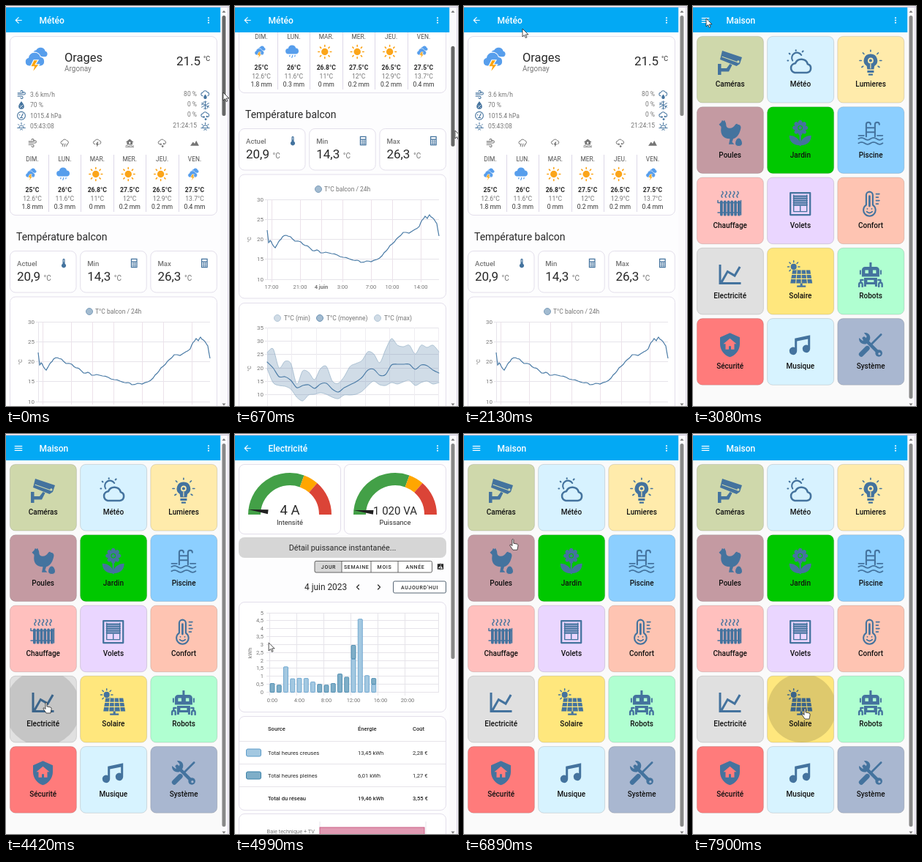
These frames come from a looping animation (305x546 px, 8 s). An HTML page:

```html
<!DOCTYPE html>
<html lang="fr">
<head>
<meta charset="utf-8">
<title>Maison</title>
<style>
html, body { margin: 0; width: 100%; height: 100%; overflow: hidden; background: #fafafa; }
svg { display: block; width: 305px; height: 546px; font-family: Roboto, "Noto Sans", sans-serif; }
</style>
</head>
<body>
<svg id="stage" viewBox="0 0 305 546" xmlns="http://www.w3.org/2000/svg"></svg>
<script>
const BLUE = '#44739e', GREY = '#757575', INK = '#282828';
const LOOP = 8000;

// ---------- drawing helpers ----------
const rect = (x, y, w, h, fill, extra = '') =>
  `<rect x="${x}" y="${y}" width="${w}" height="${h}" fill="${fill}" ${extra}/>`;
const card = (x, y, w, h) => rect(x + .5, y + .5, w - 1, h - 1, '#fff', 'rx="7.5" stroke="#e3dfeb"');
const circle = (x, y, r, fill, extra = '') => `<circle cx="${x}" cy="${y}" r="${r}" fill="${fill}" ${extra}/>`;
const line = (x1, y1, x2, y2, c = '#e6e4ea', w = 1) =>
  `<path d="M${x1} ${y1}L${x2} ${y2}" stroke="${c}" stroke-width="${w}"/>`;
const crisp = v => Math.floor(v) + .5;
const text = (s, x, y, size, fill = INK, anchor = 'start', weight = 400, extra = '') =>
  `<text x="${x}" y="${y}" font-size="${size}" fill="${fill}" text-anchor="${anchor}" font-weight="${weight}" ${extra}>${s}</text>`;
const sideText = (s, x, y) => text(s, 0, 0, 7.5, GREY, 'middle', 400, `transform="translate(${x} ${y}) rotate(-90)"`);
const fillPath = (d, c = 'currentColor', extra = '') => `<path d="${d}" fill="${c}" fill-rule="evenodd" ${extra}/>`;
const strokePath = (d, w = 2, c = 'currentColor') =>
  `<path d="${d}" fill="none" stroke="${c}" stroke-width="${w}" stroke-linecap="round" stroke-linejoin="round"/>`;
const range = n => [...Array(n).keys()];

function smooth(pts) {
  let d = `M${pts[0]}`;
  for (let i = 0; i < pts.length - 1; i++) {
    const a = pts[i - 1] || pts[i], b = pts[i], c = pts[i + 1], e = pts[i + 2] || c;
    const k = 1 / 7;
    d += `C${b[0] + (c[0] - a[0]) * k} ${b[1] + (c[1] - a[1]) * k} ${c[0] - (e[0] - b[0]) * k} ${c[1] - (e[1] - b[1]) * k} ${c}`;
  }
  return d;
}

// ---------- icons on a 24 unit grid ----------
const rays = (x, y, a, b, n, w) => strokePath(range(n).map(i => {
  const c = Math.cos(i * 2 * Math.PI / n), s = Math.sin(i * 2 * Math.PI / n);
  return `M${x + a * c} ${y + a * s}L${x + b * c} ${y + b * s}`;
}).join(''), w);
const skyLine = strokePath('M6 15A4 4 0 0 1 6 7A6 6 0 0 1 17 6A4.6 4.6 0 0 1 18 15', 1.8);
const WAVES = 'M1 17q2.7-2 5.5 0t5.5 0t5.5 0t5.5 0M1 21q2.7-2 5.5 0t5.5 0t5.5 0t5.5 0';
const RIM = 'stroke="#fff" stroke-width=".8"';

const ICONS = {
  back: fillPath('M20 11v2H8l5.5 5.5-1.4 1.4L4.2 12l7.9-7.9 1.4 1.4L8 11Z'),
  menu: fillPath('M3 6h18v2H3ZM3 11h18v2H3ZM3 16h18v2H3Z'),
  dots: circle(12, 6, 2, 'currentColor') + circle(12, 12, 2, 'currentColor') + circle(12, 18, 2, 'currentColor'),
  wind: strokePath('M3 8h10a3 3 0 1 0-3-4M3 12h16a3 3 0 1 0-3-4M3 16h10a3 3 0 1 1-3 4', 2),
  drop: fillPath('M12 2C9 7 5 10 5 15a7 7 0 0 0 14 0C19 10 15 7 12 2Z') + strokePath('M9 18l6-6M9.5 13h.1M14.500 17.500h.1', 1.8, '#fff'),
  gauge: circle(12, 12, 10, 'none', 'stroke="currentColor" stroke-width="2"') + strokePath('M12 15l4-8M7 10h1M9 17h6', 2.2),
  horizon: strokePath('M2 16h20M6 16a6 6 0 0 1 12 0M12 3v4M4 7l2 2M20 7l-2 2M9 21l3-2 3 2', 1.8),
  rain: skyLine + strokePath('M8 14l-2 6M13 14l-2 7M18 15l-2 5', 2),
  shower: skyLine + fillPath('M12 11c-2 3-4 5-4 7.500a4 4 0 0 0 8 0c0-2.500-2-4.500-4-7.500Z'),
  snow: strokePath('M12 2v20M3 7l18 10M21 7L3 17M9 3l3 3 3-3M9 21l3-3 3 3M3 11l4-2V5M21 13l-4 2v4', 1.7),
  hail: skyLine + circle(8.5, 15, 2.3, 'currentColor') + circle(13, 20.5, 2.5, 'currentColor') + circle(16, 14, 2, 'currentColor'),
  storm: skyLine + fillPath('M12 9l-4 7h3v6l5-8h-3l2-5Z'),
  flood: fillPath('M12 2L2 10h3v6h14v-6h3ZM10 9h4v5h-4Z') + strokePath('M2 19q2.5-2 5 0t5 0t5 0t5 0M2 22h20', 1.6),
  hills: fillPath('M1 19L8 9l4 5 4-8 7 13Z'),
  thermo: fillPath('M9.500 13V4.500a2.500 2.500 0 0 1 5 0V13a5 5 0 1 1-5 0Z') + strokePath('M12 5v4', 1.2, '#fff'),
  calc: fillPath('M5 2h14v20H5ZM7 4v4h10V4ZM7 10v3h2.500v-3ZM11 10v3h2.500v-3ZM15 10v3h2v-3ZM7 14v3h2.500v-3ZM11 14v3h2.500v-3ZM15 14v3h2v-3ZM7 18v2h2.500v-2ZM11 18v2h2.500v-2ZM15 18v2h2v-2Z'),
  sun: circle(12, 12, 5.8, 'currentColor') + rays(12, 12, 9, 11, 8, 2),
  cloudBolt: fillPath('M12.500 9.500a3 3 0 0 1-.3-6a4.500 4.500 0 0 1 8.300 1a2.600 2.600 0 0 1 0 5Z', '#579eec') +
    fillPath('M5.500 18a4 4 0 0 1-.5-7.800a5.800 5.800 0 0 1 11.200-.8a4.400 4.400 0 0 1 .3 8.600Z', '#579eec', RIM) +
    fillPath('M10 12.500L7 18.500h3.300L8.500 24.500l6.500-8h-3.500l2.500-4Z', '#fda50f', RIM),
  cloudRain: fillPath('M5.500 15.500a4.500 4.500 0 0 1-.3-9a6.500 6.500 0 0 1 12.600-.5a4.800 4.800 0 0 1 .7 9.500Z', '#579eec') +
    strokePath('M8 18l-.5 1.500M12.500 18l-1.200 3.500M16.500 18l-.5 1.500', 1.5, '#579eec'),
  compare: fillPath('M3 4h8V2h2v20h-2v-2H3ZM5 17h6v-7Z') + fillPath('M14 4h7v16h-7v-2h5l-5-8Z'),

  camera: fillPath('M5 1L23 7L21 13L18 15L3 9Z') + strokePath('M5 6.5l14 5', .8, '#cfd8ab') + circle(19.6, 11, 1.1, '#cfd8ab') +
    fillPath('M1 13h3v10H1ZM4 17h5l3-4 2 1-3 6H4Z'),
  weather: strokePath('M5 10a4.5 4.5 0 0 1 8-5M8 1V.5M2.5 4L2 3.5M1 10H.5M14 2l.6-.6', 1.4) +
    strokePath('M7 21h11a4 4 0 0 0 .8-7.8A6 6 0 0 0 7.5 12.5A4.3 4.3 0 0 0 7 21Z', 1.7),
  bulb: fillPath('M12 4a6 6 0 0 1 3.5 11L15 18H9l-.5-3A6 6 0 0 1 12 4Z') + circle(12, 10, 2, 'none', 'stroke="#ffebab" stroke-width="1.2"') +
    strokePath('M12 13v4', .8, '#ffebab') + fillPath('M9 19h6v2H9ZM10 22h4v1.5h-4Z') +
    strokePath('M12 .5v1.2M5 3l1 1M19 3l-1 1M2 10h1.6M20.4 10H22M4 16l1.2-.8M20 16l-1.2-.8', 1.1),
  hen: fillPath('M2 4l2-2 1-2 1 1 1-1 1 2c1 2 0 4 2 5 3 1 5 0 7-3 1-1 2-1 2 0 2 0 3 1 3 3-1 5-3 9-7 10l-1 3 2 2h-5l1-5c-6 0-9-4-8-10L4 6Z') +
    fillPath('M20 16c2 0 3.4 3 3.4 5a3.4 2.9 0 0 1-6.8 0c0-2 1.4-5 3.4-5Z', 'currentColor', 'stroke="#c49aa2" stroke-width=".8"'),
  flower: range(8).map(i => `<ellipse cx="12" cy="3" rx="2" ry="3" fill="currentColor" transform="rotate(${i * 45} 12 7)"/>`).join('') +
    circle(12, 7, 2.2, '#00c800') + circle(12, 7, 1.5, 'currentColor') + strokePath('M12 13v10', 1.5) +
    fillPath('M12 23C4 23 2 18 2 14c5 0 10 3 10 9ZM12 23c8 0 10-5 10-9-5 0-10 3-10 9Z'),
  pool: strokePath('M8 15V4a2 2 0 0 1 4 0M16 15V4a2 2 0 0 1 4 0M8 7h8M8 11h8', 1.4) + strokePath(WAVES, 1.2) + strokePath('M1 14h5M18 14h5', 1.1),
  radiator: range(6).map(i => rect(3 + i * 3.2, 9, 2.5, 14, 'currentColor', 'rx="1"')).join('') +
    strokePath('M1 11h21M1 20h21M1 11v-2M22 9v13', 1) +
    strokePath(range(5).map(i => `M${5 + i * 3.5} 6q-1.5-1.3 0-2.6t0-2.6`).join(''), 1),
  shutter: strokePath('M3 2h18v20H3Z', 1.5) + strokePath('M6 5h12M6 7h12M6 9h12M6 11h12M6 13h12', 1.4) + strokePath('M6 4v15h12V4M12 14v5', .9),
  comfort: strokePath('M8 13V4a3 3 0 0 1 6 0v9a5.5 5.5 0 1 1-6 0Z', 1.4) + strokePath('M11 5v9', 1.8) +
    strokePath('M8.5 19q2.5 2.5 5 0M9 16.5h.1M13 16.5h.1', 1.2) + strokePath('M17 3h3M17 6h2M17 9h3M17 12h2', 1.1),
  chart: fillPath('M16 11.8l4.2-7.3 1.8 1-5.3 9-6.5-3.7L5.5 19H22v2H2V3h2v14.5L9.5 8Z'),
  solar: circle(6, 5, 2.7, 'currentColor') + rays(6, 5, 4.1, 5.5, 8, 1) + fillPath('M5 8h16l2 12H3Z') +
    strokePath('M4.5 12h18M4 16h19M9 8l-1 12M13 8v12M17 8l1.5 12', .7, '#ffe77d') + fillPath('M12 20h2v2h3v1.5H9V22h3Z'),
  robot: fillPath('M11 1h2v4h4a3 3 0 0 1 3 3v6H4V8a3 3 0 0 1 3-3h4ZM7 8v3h3V8ZM14 8v3h3V8ZM2 8h1.3v4H2ZM20.7 8H22v4h-1.3Z') +
    fillPath('M6 15h12v8h-2v-2H8v2H6ZM9 17v2h6v-2Z') + strokePath('M5 17H3v2M19 17h2v2M1.5 23v-2a1.5 1.5 0 0 1 3 0v2M19.5 23v-2a1.5 1.5 0 0 1 3 0v2', 1.6),
  shield: fillPath('M11 13h2v3h3v-5h2l-6-5-6 5h2v5h3ZM12 1l9 4v6c0 5.5-3.8 10.7-9 12-5.2-1.3-9-6.5-9-12V5Z'),
  music: fillPath('M21 3v12.5a3.5 3.5 0 1 1-2-3.2V6.5L9 8.6v8.9a3.5 3.5 0 1 1-2-3.2V6Z'),
  tools: strokePath('M6 6l13 13', 3) + strokePath('M21.500 2.500l-9 9', 1.8) + strokePath('M9 15l-5.500 5.500', 4.4) +
    fillPath('M1.500 5.500l3 2.500 3-1 1-3-2.500-3c4-1 7 3 5 7l-3 3c-4 1-7-2-6.500-5.500Z') + circle(19.500, 19.500, 3.2, 'currentColor') +
    circle(20, 20, 1.1, '#a9b7d0')
};
const icon = (name, x, y, size, color = BLUE) =>
  `<g transform="translate(${x - size / 2} ${y - size / 2}) scale(${size / 24})" color="${color}">${ICONS[name]}</g>`;

// ---------- weather page ----------
function balconyChart() {
  const top = 431, step = 27.3;
  let out = card(5, 396.5, 284, 170) + circle(114, 417, 4.5, '#a2bbd0', 'stroke="#7f9fbc"') +
    text('T°C balcon / 24h', 122, 420, 8.5, GREY);
  range(5).forEach(i => {
    const y = crisp(top + i * step);
    out += line(41, y, 279, y) + text(30 - i * 5, 39, y + 2.5, 8, GREY, 'end');
  });
  const ticks = { '17:00': 50, '21:00': 89, '4 juin': 118, '3:00': 147, '7:00': 186, '10:00': 215, '14:00': 254 };
  for (const [label, x] of Object.entries(ticks))
    out += line(x + .5, top, x + .5, 544, '#ece2ea') + text(label, x, 553, 7.6, GREY, 'middle', label === '4 juin' ? 700 : 400);
  out += line(44.5, top, 44.5, 540) + sideText('°C', 22, 486);
  const pts = '44,473 46,490 48,487 51,492 55,497 58,492 61,487 65,482 70,480 76,482 82,488 90,489 96,494 100,495 106,501 112,500 117,504 124,503 132,505 140,507 148,510 156,512 162,514 167,514 172,517 180,515 186,516 194,513 201,508 207,501 212,494 218,489 223,483 230,476 238,477 246,472 252,468 256,459 260,454 263,457 266,452 270,456 274,461 276,464 279,481';
  const coarse = pts.split(' ').map(p => p.split(',').map(Number));
  const fine = coarse.flatMap((p, i) => {
    const q = coarse[i + 1];
    return q ? [p, [(p[0] + q[0]) / 2, (p[1] + q[1]) / 2 + Math.sin(i * 2.4) * .8]] : [p];
  });
  return out + `<path d="M${fine.join('L')}" fill="none" stroke="#4a7ba6" stroke-width="1.2"/>`;
}

function rangeChart() {
  const curve = s => s.split(' ').map((y, i) => [44 + i * 8.1, +y]);
  const high = curve('640 635 661 652 655 683 665 667 677 662 659 679 682 673 659 655 651 639 642 654 636 621 630 632 630 642 630 633 630 639');
  const mean = curve('653 661 673 673 678 688 685 684 689 683 682 690 694 688 684 680 674 664 663 671 670 657 656 656 656 663 657 658 664 668');
  const low = curve('662 681 685 686 690 701 706 698 697 695 697 701 703 698 698 697 693 685 679 684 685 681 683 680 678 685 681 679 683 681');
  let out = card(5, 572, 284, 180);
  [[58, 'min'], [116, 'moyenne'], [195, 'max']].forEach(([x, name], i) => {
    out += circle(x, 593, 4.5, i === 1 ? '#a2bbd0' : '#d0dce6', `stroke="${i === 1 ? '#6d93b5' : '#b4c7d8'}"`) +
      text(`T°C (${name})`, x + 9, 596, 8.5, GREY);
  });
  range(7).forEach(i => {
    const y = crisp(606.5 + i * 18.2);
    out += line(41, y, 279, y) + text(35 - i * 5, 39, y + 2.5, 8, GREY, 'end');
  });
  range(8).forEach(i => out += line(crisp(44 + i * 33.5), 606, crisp(44 + i * 33.5), 720, '#efedf2'));
  out += sideText('°C', 22, 662);
  return out + `<path d="${smooth(high)}L${smooth([...low].reverse()).slice(1)}Z" fill="${BLUE}" fill-opacity=".25"/>` +
    strokePath(smooth(high), .8, '#9db6cb') + strokePath(smooth(low), .8, '#9db6cb') + strokePath(smooth(mean), 1.1, '#4a7ba6');
}

function weatherPage() {
  let out = card(5, 41, 284, 245) + icon('cloudBolt', 41, 73, 36) +
    text('Orages', 80, 76.3, 16.5) + text('Argonay', 80, 89, 10, GREY) +
    text('21.5', 233, 81, 17) + text('°C', 270, 74.5, 9);
  const left = [['wind', '3.6 km/h'], ['drop', '70 %'], ['gauge', '1015.4 hPa'], ['horizon', '05:43:08']];
  const right = [['shower', '80 %'], ['snow', '0 %'], ['hail', '0 %'], ['horizon', '21:24:15']];
  range(4).forEach(i => {
    const y = 121 + i * 14.4;
    out += icon(left[i][0], 21, y, 13) + text(left[i][1], 33, y + 3, 8.5, GREY) +
      icon(right[i][0], 272.5, y, 13.5) + text(right[i][1], 261, y + 1.6, 8.5, GREY, 'end');
  });
  const days = [
    ['DIM.', 'wind', 'cloudBolt', 25, 12.6, 1.8], ['LUN.', 'rain', 'cloudRain', 26, 11.6, .3],
    ['MAR.', 'storm', 'sun', 26.8, 11, 0], ['MER.', 'flood', 'sun', 27.5, 12, .2],
    ['JEU.', 'hail', 'sun', 26.5, 12.9, .2], ['VEN.', 'hills', 'cloudBolt', 27.5, 13.7, .4]
  ];
  const skySize = { sun: 19.5, cloudBolt: 17.5, cloudRain: 20 };
  days.forEach(([day, small, sky, max, min, mm], i) => {
    const x = 36 + i * 44.4;
    out += icon(small, x, 187, 13, GREY) + text(day, x, 211.5, 8.4, '#505050', 'middle') +
      icon(sky, x - 2, 229.5, skySize[sky], '#fba51a') +
      text(max + '°C', x, 253.5, 8.6, INK, 'middle', 700) + text(min + '°C', x, 265.5, 8.6, GREY, 'middle') +
      text(mm + ' mm', x, 277.3, 8.6, '#333', 'middle');
    if (i) out += line(crisp(x - 22), 203, crisp(x - 22), 281, '#ddd8e8');
  });
  out += text('Température balcon', 14, 319.8, 14);
  [['Actuel', '20,9', 'thermo'], ['Min', '14,3', 'calc'], ['Max', '26,3', 'calc']].forEach(([label, value, sign], i) => {
    const x = 5 + i * 96.2;
    out += card(x, 334, 91.5, 57.5) + text(label, x + 10, 354.5, 9.6, GREY, 'start', 500) + icon(sign, x + 74, 351, 15) +
      text(value, x + 10, 375, 17) + text('°C', x + 46.5, 375, 10, GREY);
  });
  return out + balconyChart() + rangeChart();
}

// ---------- home page ----------
const TILES = [
  ['Caméras', 'camera', '#cfd8ab'], ['Météo', 'weather', '#d7f2ff'], ['Lumieres', 'bulb', '#ffebab'],
  ['Poules', 'hen', '#c49aa2'], ['Jardin', 'flower', '#00c800'], ['Piscine', 'pool', '#8ccfff'],
  ['Chauffage', 'radiator', '#ffc0be'], ['Volets', 'shutter', '#ead6ff'], ['Confort', 'comfort', '#fec4b2'],
  ['Electricité', 'chart', '#e0e0e0'], ['Solaire', 'solar', '#ffe77d'], ['Robots', 'robot', '#b0ffd1'],
  ['Sécurité', 'shield', '#ff7b7b'], ['Musique', 'music', '#d7f3ff'], ['Système', 'tools', '#a9b7d0']
];
const tileX = i => 5 + (i % 3) * 96.2;
const tileY = i => 41 + Math.floor(i / 3) * 96.3;
const tileBox = (i, fill, extra) => rect(tileX(i) + .4, tileY(i) + .4, 91, 90.7, fill, `rx="7.5" ${extra}`);

function homePage() {
  return TILES.map(([label, sign, color], i) =>
    tileBox(i, color, 'stroke="#000" stroke-opacity=".16" stroke-width=".8"') +
    icon(sign, tileX(i) + 45.5, tileY(i) + 36.5, 36) +
    text(label, tileX(i) + 45.7, tileY(i) + 69.2, 10, '#111', 'middle', 500)).join('');
}

// ---------- electricity page ----------
function gauge(cx, value, label, size, turn) {
  const cy = 110, R = 48.5;
  const at = deg => `${cx + R * Math.cos(deg * Math.PI / 180)} ${cy - R * Math.sin(deg * Math.PI / 180)}`;
  const arc = (a, b, c) => `<path d="M${at(a)}A${R} ${R} 0 0 1 ${at(b)}" fill="none" stroke="${c}" stroke-width="17"/>`;
  return card(cx - 70, 41, 140, 96) + arc(180, 70, '#43a047') + arc(70, 49, '#ffa600') + arc(49, 0, '#db4437') +
    `<path d="M-30 -3L-57 0L-30 3Z" fill="#212121" transform="translate(${cx} ${cy}) rotate(${turn})"/>` +
    text(value, cx, 109.5, size, INK, 'middle') + text(label, cx, 124, 9.3, INK, 'middle');
}

function energyChart() {
  const base = 352.5, unit = 21.7;
  let out = card(5, 229, 284, 151);
  range(11).forEach(i => {
    const y = crisp(base - i * unit / 2);
    out += line(43, y, 278, y) + text(String(i / 2).replace('.', ','), 39, y + 2.6, 7.5, GREY, 'end');
  });
  range(6).forEach(i => {
    const x = 47.5 + i * 37;
    out += line(x, 244, x, 357) + text(i * 4 + ':00', x + 3.5, 366, 7.5, GREY, 'middle');
  });
  out += line(278.5, 244, 278.5, 353) + sideText('kWh', 23, 299);
  const low = [0, 0, 1.6, .85, .88, .87, .65, 0, 0, 0, 0, 0, 2.1, 4.6, 1.05, .5];
  const full = [.55, .45, 0, 0, 0, 0, 0, .5, .45, .55, 1.15, .95, .85, 0, 0, .37];
  const bar = (i, from, h, fill, edge) => h ?
    rect(48 + i * 9.25, base - (from + h) * unit, 6, h * unit, fill, `rx="1" stroke="${edge}" stroke-width=".8"`) : '';
  low.forEach((v, i) => out += bar(i, 0, v, '#a3c8e1', '#5c9cc9') + bar(i, v, full[i], '#7faec8', '#3b82a9'));
  return out;
}

function powerPage() {
  const mid = (s, x, y) => text(s, x, y, 7, INK, 'middle', 500, 'letter-spacing=".65"');
  let out = gauge(75, '4 A', 'Intensité', 18.5, 7) + gauge(219, '1 020 VA', 'Puissance', 15, 6) +
    rect(5, 141, 284, 28, '#d6d6d6', 'rx="8"') + text('Détail puissance instantanée...', 147, 158.7, 10.8, INK, 'middle') +
    rect(109, 173.5, 160.5, 15.5, '#fff', 'rx="2"') + rect(109, 173.5, 37, 15.5, '#d8d8d8') +
    rect(109, 173.5, 160.5, 15.5, 'none', 'rx="2" stroke="#555" stroke-width=".9"');
  [146, 186, 223].forEach(x => out += line(x, 173.5, x, 189, '#555', .9));
  out += mid('JOUR', 128, 183.8) + mid('SEMAINE', 166.2, 183.8) + mid('MOIS', 204.5, 183.8) + mid('ANNÉE', 246.5, 183.8) +
    icon('compare', 281, 181, 11, INK) + text('4 juin 2023', 95, 213, 11.9) +
    strokePath('M169.5 206l-3 3 3 3M195.5 206l3 3-3 3', 1.2, INK) +
    rect(216.5, 201, 72, 16, '#fff', 'rx="2" stroke="#456" stroke-width=".9"') + mid("AUJOURD'HUI", 252.5, 211.6) +
    energyChart() + card(5, 385, 284, 129);
  const rows = [['Source', 'Énergie', 'Coût', 405], ['Total heures creuses', '13,45 kWh', '2,28 €', 437.5],
    ['Total heures pleines', '6,01 kWh', '1,27 €', 468.5], ['Total du réseau', '19,46 kWh', '3,55 €', 500]];
  rows.forEach(([name, kwh, cost, y], i) => {
    const cell = (s, x) => text(s, x, y, 7.6, INK, 'start', i % 3 ? 400 : 500);
    out += cell(name, 45) + cell(kwh, 168) + cell(cost, 243);
    if (i) out += line(6, crisp(y - 18.5), 288, crisp(y - 18.5));
  });
  out += rect(15.5, 430, 20, 10, '#a3c8e1', 'rx="2" stroke="#5c9cc9"') + rect(15.5, 461, 20, 10, '#7faec8', 'rx="2" stroke="#3b82a9"');
  out += card(5, 518, 284, 60) + line(116, 529, 116, 546) + line(261, 529, 261, 546) +
    text('Baie technique + TV', 109, 545, 7.4, GREY, 'end') + rect(116, 537, 143, 14, '#e09ab2', 'stroke="#c8547e" stroke-width=".9"');
  return out;
}

// ---------- stage ----------
const header = (title, sign) => rect(0, 2, 293.5, 34, '#03a9f4') + icon(sign, 17, 19.5, 14, '#fff') +
  text(title, 45.5, 23.7, 12, '#fff', 'start', 500) + icon('dots', 277, 19.5, 13, '#fff');
const paper = rect(0, 0, 305, 546, '#fdfdfe');

const stage = document.getElementById('stage');
stage.innerHTML = `<defs><clipPath id="clip10">${tileBox(10, '#000', '')}</clipPath><clipPath id="clip9">${tileBox(9, '#000', '')}</clipPath></defs>` +
  rect(0, 0, 305, 546, '#fafafa') +
  `<g id="weather">${paper}<g id="scroller">${weatherPage()}</g>${header('Météo', 'back')}</g>` +
  `<g id="home">${homePage()}${header('Maison', 'menu')}</g>` +
  `<g id="power">${paper}${powerPage()}${header('Electricité', 'back')}</g>` +
  `<g id="ripple9" clip-path="url(#clip9)">${circle(50, 374, 52, '#000', 'opacity=".12"')}</g>` +
  `<g id="ripple10" clip-path="url(#clip10)">${circle(149, 374, 47, '#000', 'opacity=".13"')}</g>` +
  circle(17, 19.5, 14.5, '#fff', 'id="press" opacity=".16"') +
  rect(0, 0, 305, 1, '#f6f3fa') + rect(0, 1, 305, 1, '#c9c3d4') + rect(293.5, 2, 11.5, 544, '#fbfafc') +
  line(303.5, 0, 303.5, 546, '#ddd6e8') +
  fillPath('M295.5 9h5l-2.5-3Z', '#777') + fillPath('M295.5 542.5h5l-2.5 3Z', '#777') +
  rect(295.5, 13, 5, 137, '#888', 'id="thumb" rx="2.5"') +
  `<g id="arrow">${fillPath('M0 0V11L2.6 8.6L4.3 12.5L6 11.7L4.3 8H8Z', '#fff', 'stroke="#222" stroke-width=".8"')}</g>` +
  `<g id="hand">${fillPath('M0 0Q1.5-1.5 2 0V5L7 6Q8.5 6.5 8 9L7 14H1L-3 8Q-3 6-1.5 7L0 8.5Z', '#fff', 'stroke="#222" stroke-width=".8"')}</g>`;
const el = id => document.getElementById(id);
const show = (id, on) => el(id).setAttribute('display', on ? 'inline' : 'none');

// ---------- motion ----------
// The screen refreshes in bursts: start, end, number of steps.
const BURSTS = [[120, 940, 7], [1190, 2130, 8], [2270, 3200, 8], [3370, 4300, 8], [4420, 4570, 2],
  [4870, 5790, 8], [5940, 6080, 2], [6370, 6490, 2], [6770, 7610, 8], [7900, 7900, 1]];
const REFRESH = [0, ...BURSTS.flatMap(([a, b, n]) => range(n).map(i => n > 1 ? a + (b - a) * i / (n - 1) : a))];
const snap = t => REFRESH.filter(r => r <= t + .01).pop();

const SCROLL = [[0, 0], [120, 8], [393, 92], [530, 137], [667, 167], [940, 178], [1190, 172], [1324, 151],
  [1459, 105], [1593, 52], [1727, 10], [1861, 0]];
const CURSOR = [[0, 297, 118], [120, 298, 130], [667, 301, 170], [940, 301, 173], [1190, 303, 166], [1324, 304, 153],
  [1727, 301, 128], [1861, 230, 90], [2130, 80, 31], [2270, 60, 27], [2669, 18, 17], [3200, 18, 17], [4300, 54, 367],
  [4570, 54, 367], [5790, 22, 33], [6080, 18, 16], [6490, 18, 16], [7610, 152, 375]];

function track(keys, t) {
  const i = keys.findIndex(k => k[0] > t);
  if (i < 0) return keys[keys.length - 1].slice(1);
  const a = keys[i - 1], b = keys[i], u = (t - a[0]) / (b[0] - a[0]);
  return a.slice(1).map((v, j) => v + (b[j + 1] - v) * u);
}

function render(time) {
  const t = snap(time);
  const page = t < 3060 ? 'weather' : t < 4560 || t >= 6480 ? 'home' : 'power';
  ['weather', 'home', 'power'].forEach(id => show(id, id === page));

  const scroll = Math.round(track(SCROLL, t)[0]);
  el('scroller').setAttribute('transform', `translate(0 ${-scroll})`);
  const thumb = el('thumb');
  thumb.setAttribute('y', 13 + (page === 'weather' ? scroll * .25 : 0));
  thumb.setAttribute('height', { weather: 137, home: 523, power: 294 }[page]);
  thumb.setAttribute('fill', t < 1800 ? '#666' : '#888');

  show('ripple9', t >= 4420 && t < 4560);
  show('ripple10', t >= 7900);
  show('press', (t >= 2660 && t < 3060) || (t >= 5940 && t < 6480));

  const [x, y] = track(CURSOR, t);
  const hand = page === 'home' && y > 41;
  show('hand', hand);
  show('arrow', !hand);
  el(hand ? 'hand' : 'arrow').setAttribute('transform', `translate(${x} ${y})`);
}

const start = performance.now();
(function tick() {
  render((performance.now() - start) % LOOP);
  requestAnimationFrame(tick);
})();
</script>
</body>
</html>
```
